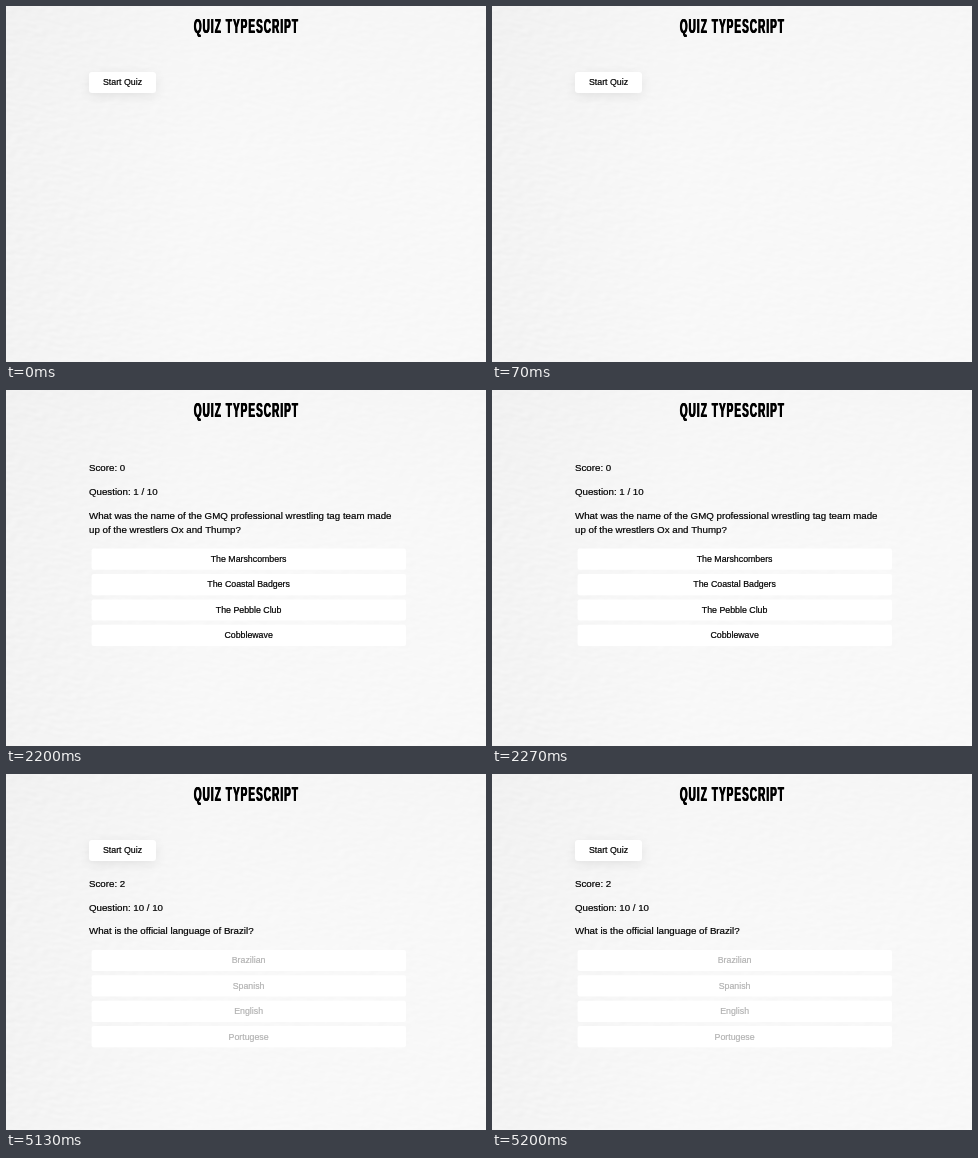
These frames come from a looping animation (480 px wide and 356 px high, 6590 ms). An HTML page with a canvas:

```html
<!DOCTYPE html>
<html lang="en">
<head>
<meta charset="utf-8">
<title>Quiz TypeScript</title>
<style>
  html, body { margin: 0; width: 100%; height: 100%; overflow: hidden; background: #f6f6f6; }
  canvas { display: block; width: 480px; height: 356px; }
</style>
</head>
<body>
<canvas id="stage" width="480" height="356"></canvas>
<script>
const W = 480, H = 356, LOOP = 6590;
const SANS = '"Liberation Sans", Arial, sans-serif';
const ctx = document.getElementById('stage').getContext('2d');
const paper = makePaper();

const scenes = [
  { from: 0, draw: startScreen },
  { from: 730, draw: loadingScreen },
  { from: 2200, draw: firstQuestion },
  { from: 3670, draw: sixthQuestion },
  { from: 5130, draw: lastQuestion }
];

// Fine plaster relief: smoothed lattice noise lit from one side
function makePaper() {
  const canvas = document.createElement('canvas');
  canvas.width = W;
  canvas.height = H;
  const c = canvas.getContext('2d');
  const img = c.createImageData(W, H);

  const hash = (x, y) => {
    const s = Math.sin(x * 127.1 + y * 311.7) * 43758.5453;
    return s - Math.floor(s);
  };
  const ease = t => t * t * (3 - 2 * t);
  const mix = (a, b, t) => a + (b - a) * t;
  const noise = (x, y) => {
    const i = Math.floor(x), j = Math.floor(y);
    const u = ease(x - i), v = ease(y - j);
    return mix(mix(hash(i, j), hash(i + 1, j), u),
               mix(hash(i, j + 1), hash(i + 1, j + 1), u), v);
  };
  const relief = (x, y) => noise((x + y * 0.5) / 7, (y - x * 0.3) / 3.5);

  for (let y = 0; y < H; y++) {
    for (let x = 0; x < W; x++) {
      const left = Math.max(0, 1 - x / 190);
      const top = Math.max(0, 1 - y / 150);
      const base = 248 - 5 * left - 2 * top;
      const bump = (relief(x, y) - relief(x + 1, y + 1)) * (5 + 4 * left);
      const v = base + bump;
      const k = (y * W + x) * 4;
      img.data[k] = img.data[k + 1] = img.data[k + 2] = v;
      img.data[k + 3] = 255;
    }
  }
  c.putImageData(img, 0, 0);
  return canvas;
}

// A hairline outline gives the text a slightly fuller weight
function text(str, x, y, size = 9.72, color = '#000', align = 'left') {
  ctx.font = `${size}px ${SANS}`;
  ctx.textAlign = align;
  ctx.fillStyle = ctx.strokeStyle = color;
  ctx.lineWidth = 0.2;
  ctx.fillText(str, x, y);
  ctx.strokeText(str, x, y);
}

function box(x, y, w, h, radius, color) {
  ctx.fillStyle = color;
  ctx.beginPath();
  ctx.roundRect(x, y, w, h, radius);
  ctx.fill();
}

// Condensed heavy heading with open tracking
function heading(baseline = 27.4, zoom = 1) {
  ctx.save();
  ctx.translate(W / 2 + 0.5, baseline);
  ctx.scale(0.47 * zoom, zoom);
  ctx.font = `bold 21px ${SANS}`;
  ctx.letterSpacing = '2.4px';
  ctx.textAlign = 'center';
  ctx.fillStyle = '#000';
  for (const dx of [-0.8, 0, 0.8]) ctx.fillText('QUIZ TYPESCRIPT', dx, 0);
  ctx.restore();
}

function button(label, y, w) {
  ctx.save();
  ctx.shadowColor = 'rgba(0,0,0,0.08)';
  ctx.shadowBlur = 11;
  ctx.shadowOffsetY = 3;
  box(83, y, w, 21, 3, '#fff');
  ctx.restore();
  text(label, 83 + w / 2, y + 13.4, 8.8, '#000', 'center');
}

function quiz(y, score, number, lines, answers, done) {
  text('Score: ' + score, 83, y);
  text(`Question: ${number} / 10`, 83, y + 23.8);
  lines.forEach((line, i) => text(line, 83, y + 47.6 + i * 14.3));
  const top = y + 63.1 + (lines.length - 1) * 14.3;
  answers.forEach((answer, i) => {
    const t = top + i * 25.4;
    box(85.6, t, 314.4, 21.2, 2, '#fff');
    text(answer, 242.6, t + 13.4, 8.8, done ? '#b2b2b2' : '#000', 'center');
  });
}

function startScreen() {
  heading();
  button('Start Quiz', 66, 67);
}

function loadingScreen() {
  heading(29.3, 1.02);
  box(80, 63, 320, 214, 1, '#f3f3f3');
  text('Loading Questions', 194.6, 173.4, 9.92);
}

function firstQuestion() {
  heading();
  quiz(81.2, 0, 1,
    ['What was the name of the GMQ professional wrestling tag team made',
     'up of the wrestlers Ox and Thump?'],
    ['The Marshcombers', 'The Coastal Badgers', 'The Pebble Club', 'Cobblewave'], false);
}

function sixthQuestion() {
  heading();
  quiz(81.2, 1, 6,
    ['What do the letters of the fast food chain VBH stand for?'],
    ['Veal Bun Half', 'Vermont Baked Haddock', 'Velvety Bouncy Hen', 'Vermont Bright Honey'], true);
  button('Next Question', 249, 84);
}

function lastQuestion() {
  heading();
  button('Start Quiz', 66, 67);
  quiz(112.8, 2, 10,
    ['What is the official language of Brazil?'],
    ['Brazilian', 'Spanish', 'English', 'Portugese'], true);
}

const began = performance.now();
let shown = null;

function frame() {
  const t = (performance.now() - began) % LOOP;
  const scene = scenes.filter(s => s.from <= t).pop();
  if (scene !== shown) {
    ctx.drawImage(paper, 0, 0);
    scene.draw();
    shown = scene;
  }
  requestAnimationFrame(frame);
}
frame();
</script>
</body>
</html>
```
